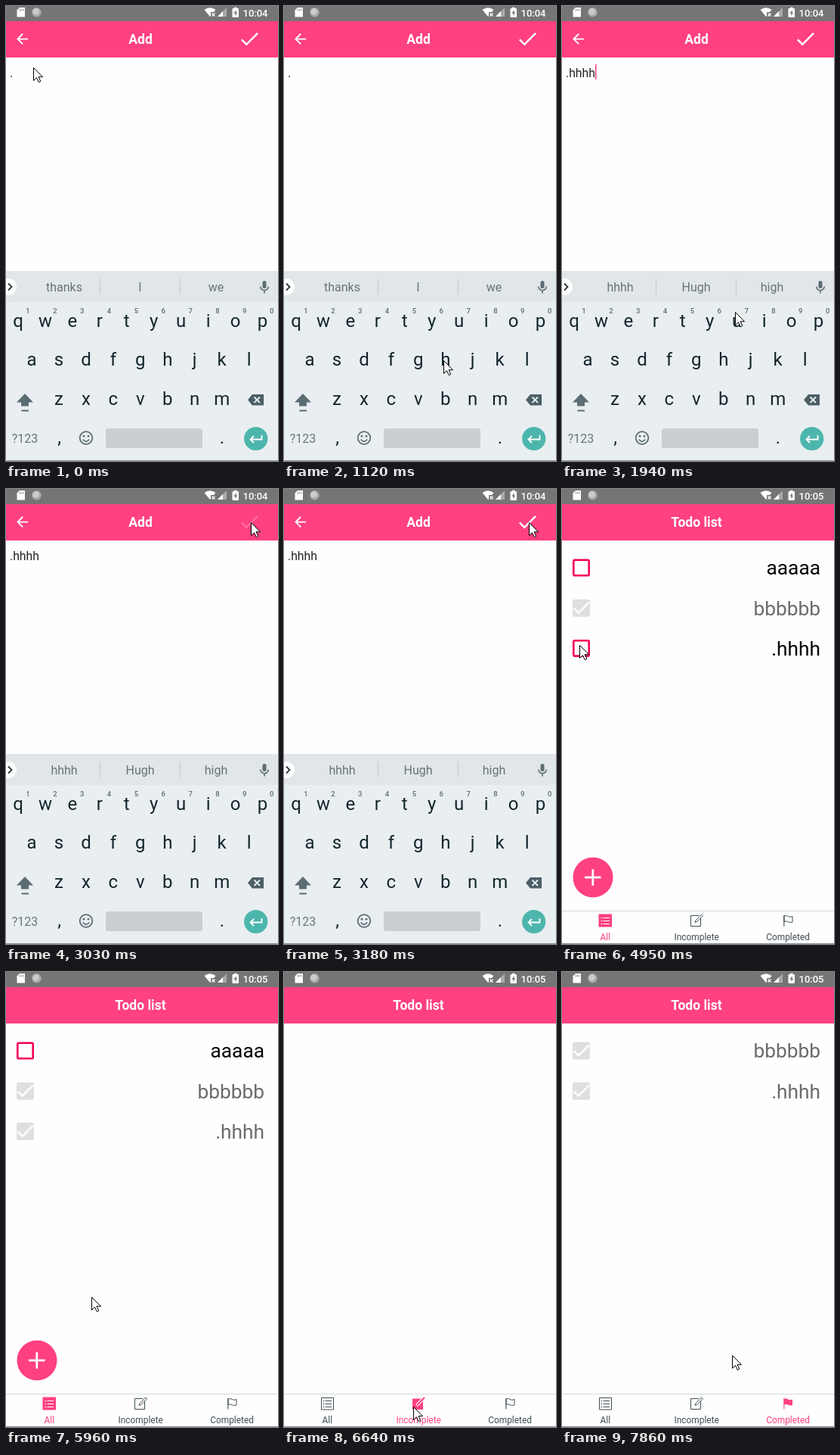
Recreate the animation shown at these times as an HTML page with a canvas. Size 360x601 px, loop 8 s.

```html
<!DOCTYPE html>
<html lang="en">
<head>
<meta charset="utf-8">
<title>Todo list app</title>
<style>
html, body { margin: 0; width: 100%; height: 100%; overflow: hidden; background: #fefefe; }
canvas { display: block; width: 360px; height: 601px; }
</style>
</head>
<body>
<canvas id="stage" width="360" height="601"></canvas>
<script>
const LOOP = 8000;
const PINK = '#ff4081', INK = '#13262c', KEY = '#5c6d73', PAPER = '#fefefe', SLATE = '#3f4f55';
const ctx = document.getElementById('stage').getContext('2d');

// Pointer moves: first jump, last jump, number of jumps, target x, target y
const START = [36, 81];
const MOVES = [
  [300, 840, 5, 204, 481],
  [980, 1120, 2, 211, 468],
  [1880, 2360, 4, 326, 60],
  [2510, 2640, 2, 324, 44],
  [3300, 3300, 1, 323, 42],
  [3860, 4410, 5, 62, 230],
  [4550, 4830, 3, 24, 206],
  [4950, 4950, 1, 23, 206],
  [5550, 6370, 7, 171, 574],
  [6760, 7180, 4, 291, 570],
  [7860, 7860, 1, 225, 506]
];
const TYPED = [1240, 1400, 1560, 1720];
const HINTS = [
  ['thanks', 'I', 'we'], ['h', 'have', 'he'], ['hh', 'he', 'hi'],
  ['hhh', 'high', 'huh'], ['hhhh', 'Hugh', 'high']
];

const ARROW = new Path2D('M0 0V17L4 13.2L6.8 19.2L9.3 18L6.6 12.2H12Z');
const BACK = new Path2D('M20 11H7.83l5.59-5.59L12 4l-8 8 8 8 1.41-1.41L7.83 13H20z');
const CHECK = new Path2D('M9 16.17L4.83 12l-1.42 1.41L9 19 21 7l-1.41-1.41z');
const FLAG = new Path2D('M294 564C298 562 300 567 305 564.5V572C300 574 298 569.5 294 571.5Z');

function rect(x, y, w, h, color, r = 0) {
  ctx.fillStyle = color;
  ctx.beginPath();
  ctx.roundRect(x, y, w, h, r);
  ctx.fill();
}

function frame(x, y, w, h, color, width, r = 0) {
  ctx.strokeStyle = color;
  ctx.lineWidth = width;
  ctx.beginPath();
  ctx.roundRect(x, y, w, h, r);
  ctx.stroke();
}

function disc(x, y, r, color) {
  ctx.fillStyle = color;
  ctx.beginPath();
  ctx.arc(x, y, r, 0, 7);
  ctx.fill();
}

function fill(d, color) {
  ctx.fillStyle = color;
  ctx.fill(new Path2D(d));
}

function line(d, color, width) {
  ctx.strokeStyle = color;
  ctx.lineWidth = width;
  ctx.stroke(new Path2D(d));
}

function icon(path, x, y, scale, color) {
  ctx.save();
  ctx.translate(x, y);
  ctx.scale(scale, scale);
  ctx.fillStyle = color;
  ctx.fill(path);
  ctx.restore();
}

function text(str, x, y, size, color, align = 'center', weight = 400) {
  ctx.font = `${weight} ${size}px Roboto, sans-serif`;
  ctx.textAlign = align;
  ctx.fillStyle = color;
  ctx.fillText(str, x, y);
}

function pointerAt(t) {
  let [x, y] = START;
  for (const [from, to, n, tx, ty] of MOVES) {
    if (t < from) break;
    const gap = n > 1 ? (to - from) / (n - 1) : 1;
    const step = Math.min(n, Math.floor((t - from) / gap + 1e-6) + 1);
    const p = step / n;
    const k = p * p * (3 - 2 * p);
    x += (tx - x) * k;
    y += (ty - y) * k;
  }
  return [Math.round(x), Math.round(y)];
}

function statusBar(t) {
  rect(0, 0, 360, 20, '#757575');
  fill('M18 2H25V14.5H14.5V5.5Z', '#fff');
  line('M18.5 4V6.5M20.7 4V6.5M22.9 4V6.5', '#888', 1);
  disc(40.5, 8.3, 6.2, '#a9a9a9');
  disc(39.5, 7.3, 4.3, '#cbcbcb');
  fill('M262.5 5Q270 -.5 277.5 5L275 8H271V13L270 14Z', '#fff');
  line('M272.5 9.5L276.5 13.5M276.5 9.5L272.5 13.5', '#fff', 1.3);
  fill('M292 2V14H280Z', '#a9a9a9');
  fill('M287 7V14H280Z', '#fff');
  rect(299.5, 3, 8.5, 12, '#fff', 1);
  rect(302, 1.7, 3.5, 2, '#fff');
  fill('M304.5 5L301.5 9.7H303.4V13L306.2 8.4H304.5Z', '#757575');
  text(t >= 4410 && t < LOOP ? '10:05' : '10:04', 330, 13.5, 13, '#fff', 'center', 500);
}

function header(title) {
  rect(0, 20, 360, 48, PINK);
  text(title, 178, 50, 17.5, '#fff', 'center', 700);
}

function keyRow(keys, x, y) {
  [...keys].forEach((key, i) => text(key, x + i * 35.95, y, 24, INK));
}

function keyboard(hints) {
  rect(0, 350, 360, 251, '#e9eef1');
  rect(0, 350, 360, 41, '#e1e6e8');
  rect(124, 360, 1, 21, '#c3c9cc');
  rect(230, 360, 1, 21, '#c3c9cc');
  hints.forEach((word, i) => text(word, 77 + i * 100.5, 377, 16, '#687479'));

  disc(3, 371, 11, '#fff');
  line('M3 366.5L7.5 371L3 375.5', '#26353a', 1.8);
  rect(339.5, 363, 5, 10, KEY, 2.5);
  line('M336.8 370.5A5.2 5.2 0 0 0 347.2 370.5M342 376V379.5', KEY, 1.6);

  keyRow('qwertyuiop', 16, 424);
  keyRow('asdfghjkl', 34, 475);
  keyRow('zxcvbnm', 70, 527);
  [...'1234567890'].forEach((n, i) => text(n, 29 + i * 35.85, 406, 9.5, KEY, 'center', 500));

  fill('M25 512L36 523.5H30V528.5H20V523.5H14Z', KEY);
  rect(20.5, 533.5, 9.5, 2, KEY);
  fill('M326 513H341V527.5H326L320 520.2Z', '#4d5f66');
  line('M328.5 516.5L336 524M336 516.5L328.5 524', '#e9eef1', 1.8);

  text('?123', 25, 577, 16, '#68777d');
  text(',', 70.5, 578, 24, INK);
  line('M97.7 570.5A8.3 8.3 0 1 1 114.3 570.5A8.3 8.3 0 1 1 97.7 570.5', KEY, 1.8);
  disc(103, 568.2, 1.4, KEY);
  disc(109, 568.2, 1.4, KEY);
  line('M101.8 572.6Q106 578 110.2 572.6', KEY, 1.7);
  rect(132, 558, 128, 26, '#c8ced1', 3);
  text('.', 286, 578, 24, INK);
  disc(330.7, 571.5, 15.6, '#4db6ac');
  line('M338.5 567V572.5H324M328 568L323.5 572.5L328 577', '#fff', 1.8);
}

function addScreen(t) {
  const count = TYPED.filter(at => t >= at).length;
  const str = '.' + 'h'.repeat(count);
  header('Add');
  icon(BACK, 10.4, 32.4, 0.93, '#fff');
  const pressed = t >= 2640 && t < 3180;
  icon(CHECK, 306.5, 27.7, 1.31, pressed ? 'rgba(255,255,255,.22)' : '#fff');
  text(str, 5, 94, 15.8, '#222', 'left');
  const caret = (t >= 300 && t < 840) || (t >= 1240 && t < 2200);
  if (caret) rect(Math.round(5 + ctx.measureText(str).width), 77, 1.5, 20, PINK);
  keyboard(HINTS[count]);
}

function item(label, row, done) {
  const y = 92.5 + row * 53.2;
  if (done) {
    rect(14, y, 23, 23, '#dfdfdf', 2.5);
    icon(CHECK, 10.6, y - 3.8, 1.24, '#fff');
  } else {
    frame(15.3, y + 1.3, 20.4, 20.4, '#f50057', 2.6, 1.5);
  }
  text(label, 342, 113.3 + row * 53.2, 26.3, done ? '#6b6b6b' : '#050505', 'right');
}

function tabBar(active) {
  const tint = i => i === active ? PINK : SLATE;
  rect(0, 557, 360, 1, '#d6d9da');

  if (active === 0) rect(48.5, 561.5, 17.5, 17, PINK);
  else frame(49.5, 562.5, 16, 15.5, SLATE, 1);
  const row = active === 0 ? '#fff' : SLATE;
  for (const y of [566.5, 570.5, 574.5]) {
    rect(51.7, y - 0.6, 1.4, 1.4, row);
    rect(54.5, y - 0.5, 8.5, 1, row);
  }

  if (active === 1) {
    rect(170, 563.5, 14, 14.5, PINK);
    line('M175.5 572.5L185 563', '#fff', 4);
    line('M176 572L186 562', PINK, 2);
  } else {
    line('M181 563.5H170.5V577.5H183.5V567', SLATE, 1);
    line('M176 572.5L177 569.8L184.7 562L186.5 563.8L178.8 571.5Z', SLATE, 1);
  }

  if (active === 2) {
    ctx.fillStyle = PINK;
    ctx.fill(FLAG);
  } else {
    ctx.strokeStyle = SLATE;
    ctx.lineWidth = 1;
    ctx.stroke(FLAG);
  }
  rect(293.3, 563, 1.1, 14.5, tint(2));

  ['All', 'Incomplete', 'Completed'].forEach((label, i) =>
    text(label, 57.3 + i * 120.9, 595.5, 11.9, tint(i)));
}

function listScreen(t) {
  header('Todo list');
  if (t < 6640) {
    item('aaaaa', 0, false);
    item('bbbbbb', 1, true);
    item('.hhhh', 2, t >= 5410);
    disc(41, 513, 26.5, PINK);
    rect(30, 511.6, 21.5, 2.8, '#fff');
    rect(39.4, 502.3, 2.8, 21.5, '#fff');
    tabBar(0);
  } else if (t < 7590) {
    if (t >= 6760) item('aaaaa', 0, false);
    tabBar(1);
  } else {
    item('bbbbbb', 0, true);
    item('.hhhh', 1, true);
    tabBar(2);
  }
}

function pointer(t) {
  const [x, y] = pointerAt(t);
  ctx.save();
  ctx.translate(x + 0.5, y + 0.5);
  ctx.fillStyle = '#fff';
  ctx.fill(ARROW);
  ctx.strokeStyle = '#000';
  ctx.lineWidth = 1;
  ctx.stroke(ARROW);
  ctx.restore();
}

function draw() {
  const t = performance.now() % LOOP;
  rect(0, 0, 360, 601, PAPER);
  statusBar(t);
  if (t < 3300) addScreen(t);
  else listScreen(t);
  rect(0, 600, 360, 1, '#8b8f91');
  pointer(t);
  requestAnimationFrame(draw);
}
draw();
</script>
</body>
</html>
```
